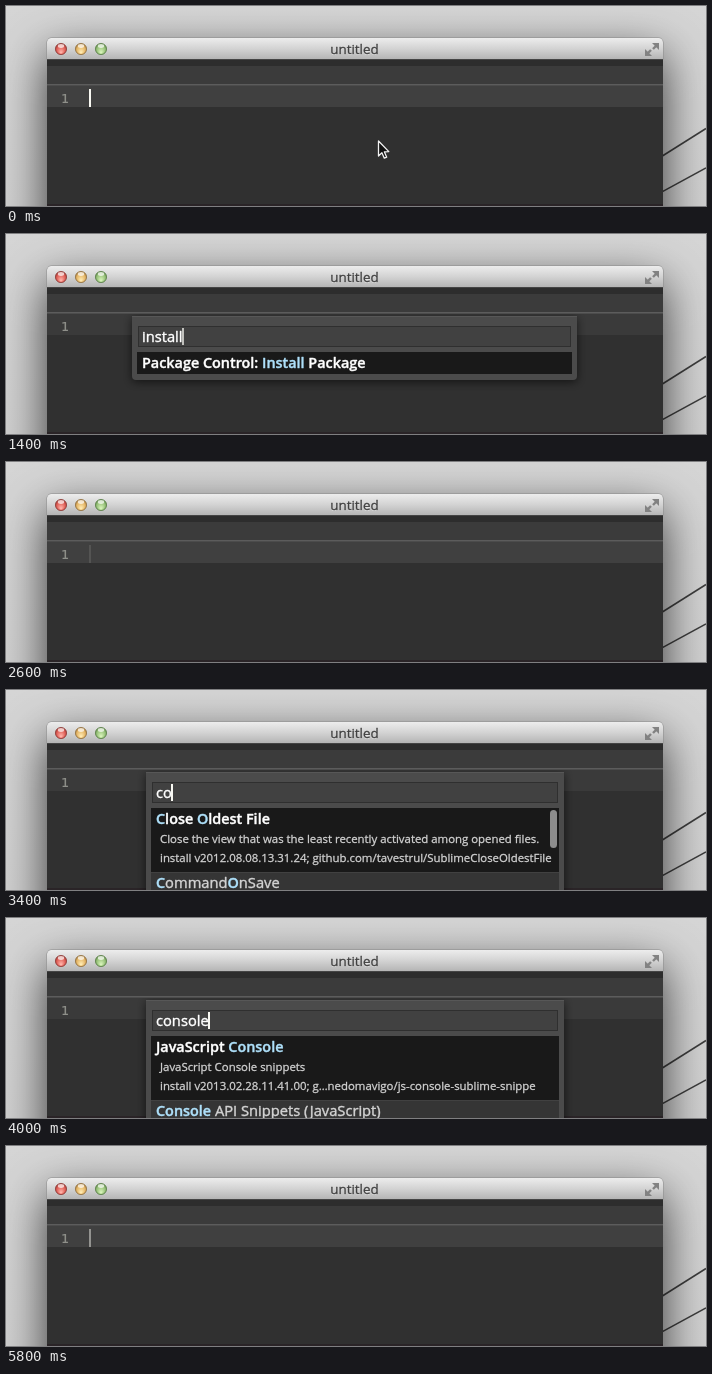
These frames come from a looping animation (700 by 200 pixels, 6000 ms). An HTML page with a canvas:

```html
<!DOCTYPE html>
<html lang="en">
<head>
<meta charset="utf-8">
<title>untitled</title>
<style>
html, body { margin: 0; width: 100%; height: 100%; overflow: hidden; background: #d2d2d2; }
canvas { display: block; width: 700px; height: 200px; }
</style>
</head>
<body>
<canvas id="stage" width="700" height="200"></canvas>
<script>
const ctx = document.getElementById('stage').getContext('2d');
const LOOP = 6000, STEP = 200;
const SANS = '"Open Sans", "Noto Sans", sans-serif';
const NORMAL = `14.7px ${SANS}`, BOLD = `600 14.4px ${SANS}`, SMALL = `11.4px ${SANS}`;
const KEYS = '11px "DejaVu Sans", sans-serif';
const MATCH = '#aee0fa';

// Asterisks mark the matched letters of a row.
const commands = [['About'], ['Bookmarks: Clear All', '⇧⌘F2'], ['Bookmarks: Select All'], ['Bookmarks: Select Next', 'F2']];
const indents = [['*I*ndentation: Convert to Spaces'], ['*I*ndentation: Convert to Tabs'],
  ['*I*ndentation: Reindent Lines'], ['*I*ndentation: Tab Width']];
const install = [['Package Control: *Install* Package']];
const closeInfo = ['Close the view that was the least recently activated among opened files.',
  'install v2012.08.08.13.31.24; github.com/tavestrul/SublimeCloseOldestFile'];
const packs = (first, next, info, bar) => ({ first, next, info, bar });
const allPacks = packs('Close Oldest File', 'CommandOnSave', closeInfo, true);
const cPacks = packs('*C*lose Oldest File', '*C*ommandOnSave', closeInfo, true);
const coPacks = packs('*C*lose *O*ldest File', '*C*ommand*O*nSave', closeInfo, true);
const jsPacks = n => {
  const hit = s => `*${s.slice(0, n)}*${s.slice(n)}`;
  return packs('JavaScript ' + hit('Console'), hit('Console') + ' API Snippets (JavaScript)',
    ['JavaScript Console snippets', 'install v2013.02.28.11.41.00; g…nedomavigo/js-console-sublime-snippe']);
};

const editor = (caret, mouse) => ({ caret, mouse });
const palette = (text, rows, caret = 1, mouse = false) => ({ text, rows, caret, mouse });
const picker = (text, found, caret = 1) => ({ text, found, caret });

// [start time, state]
const timeline = [
  [0, editor(1, true)],
  [200, editor(0.6, true)],
  [400, palette('', commands, 0.8, true)],
  [600, palette('', commands, 1, true)],
  [800, palette('i', indents)],
  [1000, palette('ins', install)],
  [1200, palette('insta', install)],
  [1400, palette('install', install, 0.7)],
  [1600, palette('install', install, 0.2)],
  [1800, editor(0.8)],
  [2000, editor(1)],
  [2400, editor(0.7)],
  [2600, editor(0.1)],
  [2800, picker('', allPacks)],
  [3000, picker('c', cPacks)],
  [3400, picker('co', coPacks)],
  [3600, picker('con', jsPacks(3))],
  [3800, picker('conso', jsPacks(5))],
  [4000, picker('console', jsPacks(7))],
  [4200, picker('console', jsPacks(7), 0.6)],
  [4400, picker('console', jsPacks(7), 0.1)],
  [4600, picker('console', jsPacks(7), 0.7)],
  [4800, editor(1)],
  [5000, editor(0.7)],
  [5200, editor(0.1)],
  [5400, editor(0.7)],
  [5600, editor(1)],
  [5800, editor(0.45)]
];

function box(x, y, w, h, fill) {
  ctx.fillStyle = fill;
  ctx.fillRect(x, y, w, h);
}

function round(x, y, w, h, r, fill) {
  ctx.beginPath();
  ctx.roundRect(x, y, w, h, r);
  ctx.fillStyle = fill;
  ctx.fill();
}

function shade(blur, dy, alpha) {
  ctx.shadowColor = `rgba(0,0,0,${alpha})`;
  ctx.shadowBlur = blur;
  ctx.shadowOffsetY = dy;
}

function poly(points, fill, line, width = 1) {
  ctx.beginPath();
  points.forEach(([x, y]) => ctx.lineTo(x, y));
  if (fill) {
    ctx.closePath();
    ctx.fillStyle = fill;
    ctx.fill();
  }
  if (line) {
    ctx.strokeStyle = line;
    ctx.lineWidth = width;
    ctx.stroke();
  }
}

// A hairline stroke gives the text its heavier smoothing.
function label(str, x, y, font, color, align = 'left', heft = 0.4) {
  ctx.font = font;
  ctx.textAlign = align;
  ctx.lineJoin = 'round';
  ctx.fillStyle = ctx.strokeStyle = color;
  ctx.fillText(str, x, y);
  ctx.lineWidth = heft;
  ctx.strokeText(str, x, y);
  return ctx.measureText(str).width;
}

function vertical(y0, y1, ...colors) {
  const g = ctx.createLinearGradient(0, y0, 0, y1);
  colors.forEach((c, i) => g.addColorStop(i / (colors.length - 1), c));
  return g;
}

function rowText(str, x, y, selected) {
  str.split('*').forEach((part, i) => {
    const hit = i % 2 === 1;
    x += label(part, x, y, selected || hit ? BOLD : NORMAL, hit ? MATCH : selected ? '#ffffff' : '#d4d4d4');
  });
}

function caretBar(x, y, h, alpha) {
  box(x, y, 2, h, `rgba(248,248,242,${alpha})`);
}

function lamp(x, edge, mid, low) {
  const g = ctx.createRadialGradient(x, 46.5, 0.5, x, 43, 6);
  g.addColorStop(0, low);
  g.addColorStop(0.7, mid);
  g.addColorStop(1, edge);
  ctx.beginPath();
  ctx.arc(x, 43, 5.6, 0, 7);
  ctx.fillStyle = g;
  ctx.fill();
  ctx.strokeStyle = edge;
  ctx.lineWidth = 0.8;
  ctx.stroke();
  ctx.beginPath();
  ctx.ellipse(x, 40, 3.2, 1.9, 0, 0, 7);
  ctx.fillStyle = 'rgba(255,255,255,.7)';
  ctx.fill();
}

function desktop() {
  box(0, 0, 700, 200, vertical(0, 200, '#d5d5d5', '#cfcfcf'));
  poly([[650, 154], [700, 122.5]], null, '#3c3c3c', 1.5);
  poly([[650, 189.2], [700, 162]], null, '#3c3c3c', 1.5);
}

function frame() {
  ctx.save();
  shade(46, 16, 0.75);
  round(41, 32, 616, 420, [5, 5, 0, 0], '#303030');
  ctx.restore();
  round(40.5, 31.5, 617, 22, [5, 5, 0, 0], '#8c8c8c');
  round(41, 32, 616, 22, [4.5, 4.5, 0, 0], vertical(32, 54, '#ededed', '#d2d2d2', '#b2b2b2'));
  box(41, 53, 616, 1, '#454545');
  lamp(55, '#8f3a36', '#dc5a52', '#ffb0a6');
  lamp(75, '#94713f', '#e2b262', '#ffeab0');
  lamp(95, '#5b8048', '#93be75', '#d6f2b8');
  label('untitled', 348.5, 48.5, `13.4px ${SANS}`, 'rgba(255,255,255,.4)', 'center', 0.1);
  label('untitled', 348.5, 47.5, `13.4px ${SANS}`, '#414141', 'center', 0.3);
  // full-screen arrows
  poly([[646, 37], [653, 37], [653, 44]], '#828282');
  poly([[639, 43], [639, 50], [646, 50]], '#828282');
  poly([[651, 39], [647, 43]], null, '#828282', 2.4);
  poly([[641, 48], [645, 44]], null, '#828282', 2.4);
}

function page(focused) {
  box(41, 54, 616, 146, '#303030');
  box(41, 54, 616, 6, '#2d2d2d');
  box(41, 60, 616, 18, '#3b3b3b');
  box(41, 78, 616, 1, '#5c5c5c');
  box(41, 79, 616, 1, '#4c4c4c');
  box(41, 80, 616, 21, focused ? '#404040' : '#3a3a3a');
  box(41, 198, 616, 2, '#2a2427');
  label('1', 55, 97, '13px "DejaVu Sans Mono", monospace', '#8f908a', 'left', 0.2);
}

function panel(x, w, h, state) {
  ctx.save();
  ctx.beginPath();
  ctx.rect(41, 80, 616, 120);
  ctx.clip();
  shade(10, 2, 0.6);
  round(x, 82, w, h, [0, 0, 4, 4], '#4b4b4b');
  ctx.restore();
  box(x, 82, w, 1, '#575757');
  box(x + 6, 92, w - 12, 21, '#2f2f2f');
  box(x + 7, 93, w - 14, 19, '#414141');
  const width = label(state.text, x + 10, 108, NORMAL, '#ffffff');
  caretBar(Math.round(x + 9 + width), 94, 17, state.caret);
}

function commandPanel(state) {
  const { rows } = state;
  panel(126, 445, rows.length > 1 ? 160 : 64, state);
  rows.forEach(([name, keys], i) => {
    const y = 118 + 22 * i;
    box(131, y, 435, 22, i ? '#353535' : '#191919');
    if (i) box(131, y, 435, 1, '#414141');
    rowText(name, 136, y + 16, i === 0);
    if (keys) label(keys, 561, y + 15, KEYS, '#8e8e8e', 'right', 0.1);
  });
}

function packagePanel(state) {
  const { first, next, info, bar } = state.found;
  panel(140, 418, 160, state);
  box(145, 118, 408, 65, '#191919');
  box(145, 183, 408, 17, '#353535');
  box(145, 182, 408, 1, '#414141');
  ctx.save();
  ctx.beginPath();
  ctx.rect(145, 118, 404, 82);
  ctx.clip();
  rowText(first, 150, 134, true);
  info.forEach((line, i) => label(line, 154, 153 + 19 * i, SMALL, '#d2d2d2', 'left', 0.3));
  rowText(next, 150, 198, false);
  ctx.restore();
  if (bar) round(544, 120, 7, 38, 3.5, '#8c8c8c');
}

function pointer(x, y) {
  const tip = [[0, 0], [0, 15], [3.4, 11.8], [5.8, 17.2], [8.2, 16.2], [5.9, 10.9], [10.3, 10.6]];
  ctx.save();
  ctx.translate(x, y);
  ctx.lineJoin = 'round';
  poly([...tip, tip[0]], '#111111', '#f2f2f2', 1.3);
  ctx.restore();
}

function draw(state) {
  const open = state.text !== undefined;
  desktop();
  frame();
  page(!open);
  if (state.rows) commandPanel(state);
  else if (state.found) packagePanel(state);
  else caretBar(83, 83, 18, state.caret);
  if (state.mouse) pointer(372.5, 135);
}

const start = performance.now();
function tick() {
  const t = (performance.now() - start) % LOOP;
  const at = Math.floor(t / STEP) * STEP;
  draw(timeline.findLast(([from]) => from <= at)[1]);
  requestAnimationFrame(tick);
}
tick();
</script>
</body>
</html>
```
